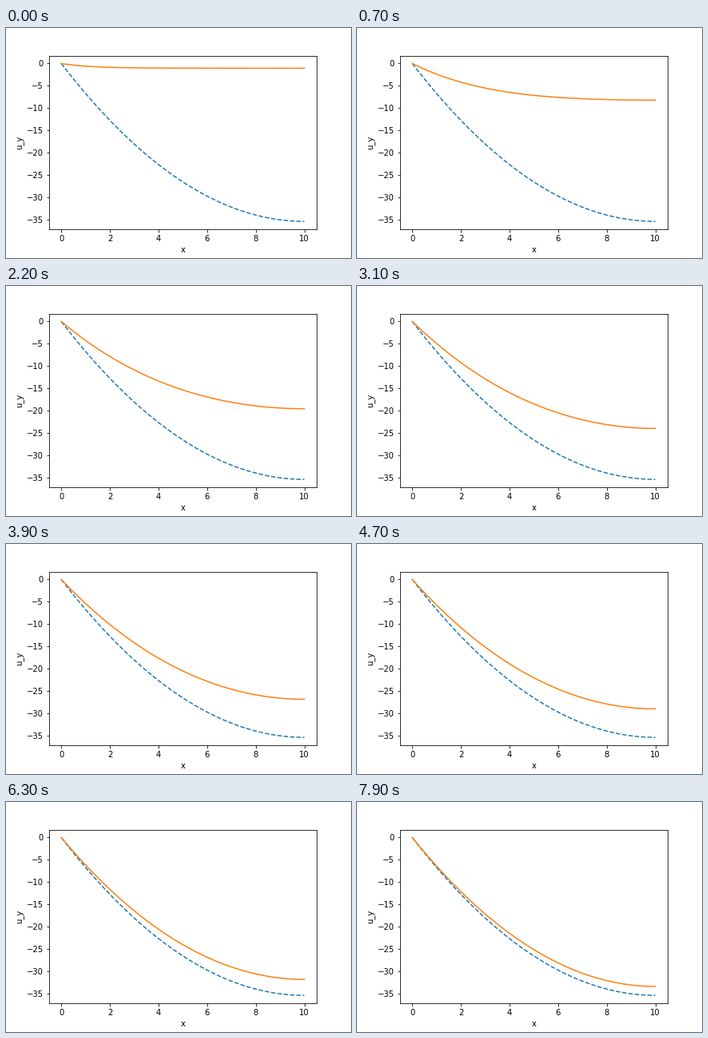
A matplotlib script that plays this animation: 432 by 288 pixels, repeating every 8 s.

```python
import numpy as np
import matplotlib.pyplot as plt
from matplotlib.animation import FuncAnimation

# Film flow down a 45 degree incline: u_t = u_xx - g, u(0) = 0, u_x(depth) = 0
DEPTH = 10.0
G = np.sin(np.pi / 4)
DT = 1.5
FRAMES = 80

x = np.linspace(0, DEPTH, 101)
steady = -G * (DEPTH * x - x**2 / 2)

mu = (np.arange(400) + 0.5) * np.pi / DEPTH
modes = np.sin(np.outer(x, mu)) * (2 * G / (DEPTH * mu**3))


def velocity(steps):
    """Profile after a number of implicit Euler steps from rest."""
    return steady + modes @ (1 + mu**2 * DT) ** -float(steps)


fig = plt.figure(figsize=(6, 4), dpi=72, facecolor="white")
fig.subplots_adjust(left=0.125, right=0.9, bottom=0.125, top=0.88)
ax = fig.add_subplot()
ax.plot(x, steady, "--", color="C0", lw=1.5)
profile, = ax.plot(x, velocity(1), color="C1", lw=1.5)
ax.set_xlim(-0.5, 10.5)
ax.set_ylim(1.05 * steady[-1], -0.05 * steady[-1])
ax.set_xlabel("x")
ax.set_ylabel("u_y")


def update(i):
    profile.set_ydata(velocity(i + 1))
    return profile,


anim = FuncAnimation(fig, update, frames=FRAMES, interval=100,
                     repeat=True, repeat_delay=0)
plt.show()
```
